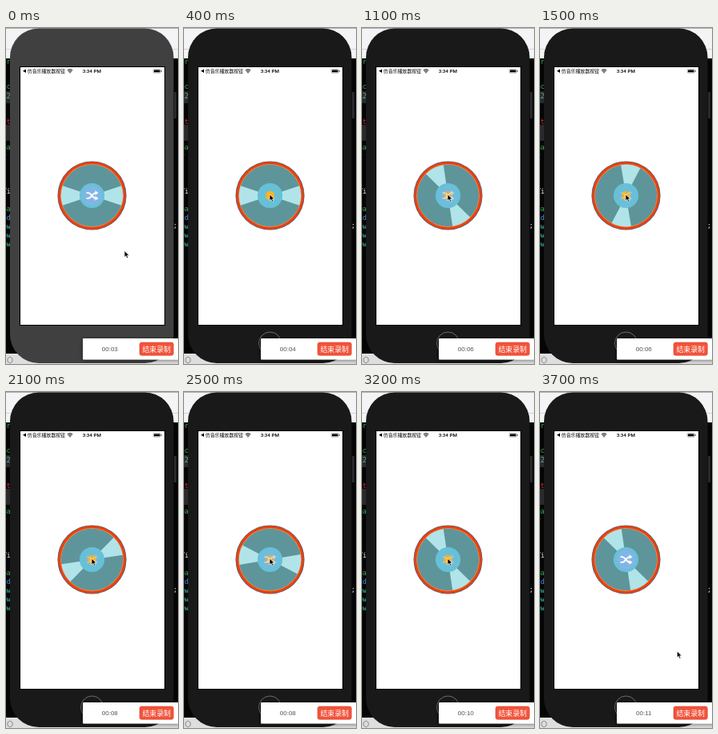
Recreate the animation shown at these times as an HTML page. Size 215 px wide and 420 px high, loop 3.8 s.

```html
<!DOCTYPE html>
<html lang="zh">
<head>
<meta charset="utf-8">
<title>Record button</title>
<style>
html, body { margin: 0; height: 100%; overflow: hidden; background: #000; }
svg { display: block; width: 100vw; height: 100vh; }
text { font-family: Roboto, "Noto Sans CJK SC", "Noto Sans CJK", sans-serif; }
.code text { font: 8px "DejaVu Sans Mono", monospace; }
</style>
</head>
<body>
<svg viewBox="0 0 215 420">
  <defs>
    <filter id="shadow" x="-20%" y="-40%" width="140%" height="180%">
      <feDropShadow dx="0" dy="1" stdDeviation="2.5" flood-opacity=".5"/>
    </filter>
  </defs>

  <!-- editor window behind the phone -->
  <rect width="215" height="420" fill="#050506"/>
  <rect width="215" height="38" fill="#f4f4f6"/>
  <rect width="215" height="1" fill="#b5b0b0"/>
  <rect y="26" width="215" height="1" fill="#d4d4d6"/>
  <path d="M0 79h6v15h-6zM0 121h6v20h-6zM210 80h3v33h-3z" fill="#2a2a2d"/>
  <g class="code" id="code"></g>
  <rect y="407" width="215" height="13" fill="#dedede"/>
  <path d="M2 413l3-2 3 2v4l-3 2-3-2z" fill="none" stroke="#777" stroke-width=".8"/>

  <!-- phone -->
  <rect id="body" x="5" y="0.5" width="204.5" height="418.5" rx="36"/>
  <circle id="home" cx="107.5" cy="394" r="14" fill="none" stroke="#777" stroke-width=".9"/>
  <rect x="17.5" y="48.5" width="181" height="323" fill="#fff" stroke="#000"/>
  <path d="M21 53.7l4-2.2v4.4z"/>
  <text x="26.8" y="56" font-size="5.9">仿音乐播放器按钮</text>
  <path d="M76.8 53q3.2-2.8 6.4 0M78 54.5q2-1.7 4 0" fill="none" stroke="#000"/>
  <path d="M79 55.6q1-.8 2 0l-1 1.2z"/>
  <text x="95.7" y="56" font-size="6.2" font-weight="500">3:34 PM</text>
  <rect x="184.2" y="51.7" width="9" height="4.4" rx="1" fill="#fff" stroke="#555" stroke-width=".5"/>
  <rect x="185" y="52.5" width="7.4" height="2.8" rx=".4"/>
  <rect x="193.7" y="53" width=".8" height="1.8" rx=".4"/>

  <!-- disc -->
  <g transform="translate(107.5 209.5)">
    <circle r="43.1" fill="#6f6066"/>
    <circle r="41.9" fill="#ff3b05"/>
    <circle r="39.4" fill="#e2954f"/>
    <circle r="38.7" fill="#5e959b"/>
    <path id="wedges" fill="#b1e4e9" d="M0 0L36.7 12.3A38.7 38.7 0 0 0 36.7-12.3L-36.7 12.3A38.7 38.7 0 0 1-36.7-12.3z"/>
    <circle r="15.6" fill="#66c1d6"/>
    <circle r="5.7" fill="#ffb21c"/>
    <g id="shuffle">
      <circle r="12" fill="#82b5e5"/>
      <path d="M-7-3.4h2.5c3.5 0 5 6.8 9 6.8M-7 3.4h2.5c3.5 0 5-6.8 9-6.8" fill="none" stroke="#fff" stroke-width="1.9"/>
      <path d="M4-6.2l4 2.8-4 2.8zM4 .6l4 2.8-4 2.8z" fill="#fff"/>
    </g>
  </g>

  <!-- recorder panel -->
  <rect x="96" y="388" width="122" height="26.5" rx="1" fill="#fff" filter="url(#shadow)"/>
  <text id="timer" x="129.8" y="403.8" font-size="8" text-anchor="middle" fill="#555" style="font-family:'Liberation Sans',sans-serif"></text>
  <rect x="167" y="393" width="42.3" height="16.3" rx="2.5" fill="#f1533b" stroke="#dc4730" stroke-width=".6"/>
  <text x="188.2" y="404.6" font-size="8.9" font-weight="500" text-anchor="middle" fill="#fff">结束录制</text>

  <path id="cursor" d="M0 0v8l1.9-1.7 1.3 3 1.5-.7-1.3-2.8h2.6z" stroke="#fff" stroke-width=".7"/>
</svg>
<script>
const LOOP = 3800, STEP = 100, PLAY = 400, STOP = 3100, SPEED = 0.09;
const $ = id => document.getElementById(id);
const clamp = x => Math.max(0, Math.min(1, x));
const ramp = (t, a, b) => clamp((t - a) / (b - a));
const smooth = x => x * x * (3 - 2 * x);
const mix = (a, b, k) => a + (b - a) * k;

const lines = [
  [45, "er", "#3fae5a"], [76, "ac", "#3fae5a"], [88, "12", "#5ab0a0"],
  [120, "it", "#e03030"], [152, "pa", "#3fae5a"], [163, "r", "#e03030"],
  [207, "Vi", "#eee"], [229, "pa", "#3fae5a"], [240, "id", "#4a8fe0"],
  [251, "ew", "#35c5a0"], [262, "ew", "#35c5a0"], [273, "ew", "#35c5a0"]
];
$("code").innerHTML = lines.map(([y, s, c]) =>
  `<text x="-4" y="${y}" fill="${c}">${s}</text>`).join("") +
  '<text x="209" y="250" fill="#eee">;</text>';

// The shuffle badge breathes while the disc turns.
const pulse = t => 0.4 * (1 - Math.cos((t - 450) / 900 * 2 * Math.PI));

function badge(t) {
  if (t < PLAY) return 1 - ramp(t, 200, PLAY);
  if (t < STOP) return pulse(t);
  return mix(pulse(STOP), 1, ramp(t, STOP, 3700));
}

function draw(t) {
  const active = t >= 300;
  $("body").setAttribute("fill", active ? "#191919" : "#404040");
  $("home").setAttribute("visibility", active ? "visible" : "hidden");

  const angle = (Math.min(Math.max(t, PLAY), STOP) - PLAY) * SPEED;
  $("wedges").setAttribute("transform", `rotate(${angle})`);
  $("shuffle").setAttribute("opacity", badge(t));

  const go = smooth(ramp(t, 0, 300)), leave = smooth(ramp(t, 3200, 3700));
  const x = mix(mix(148, 107, go), 171.3, leave);
  const y = mix(mix(278.5, 208, go), 324, leave);
  $("cursor").setAttribute("transform", `translate(${x} ${y})`);

  const sec = 4 + Math.floor((t - 75) / 505);
  $("timer").textContent = "00:" + String(sec).padStart(2, "0");
}

const start = performance.now();
function tick(now) {
  const t = Math.max(0, now - start) % LOOP;
  draw(Math.floor(t / STEP) * STEP);
  requestAnimationFrame(tick);
}
draw(0);
requestAnimationFrame(tick);
</script>
</body>
</html>
```
